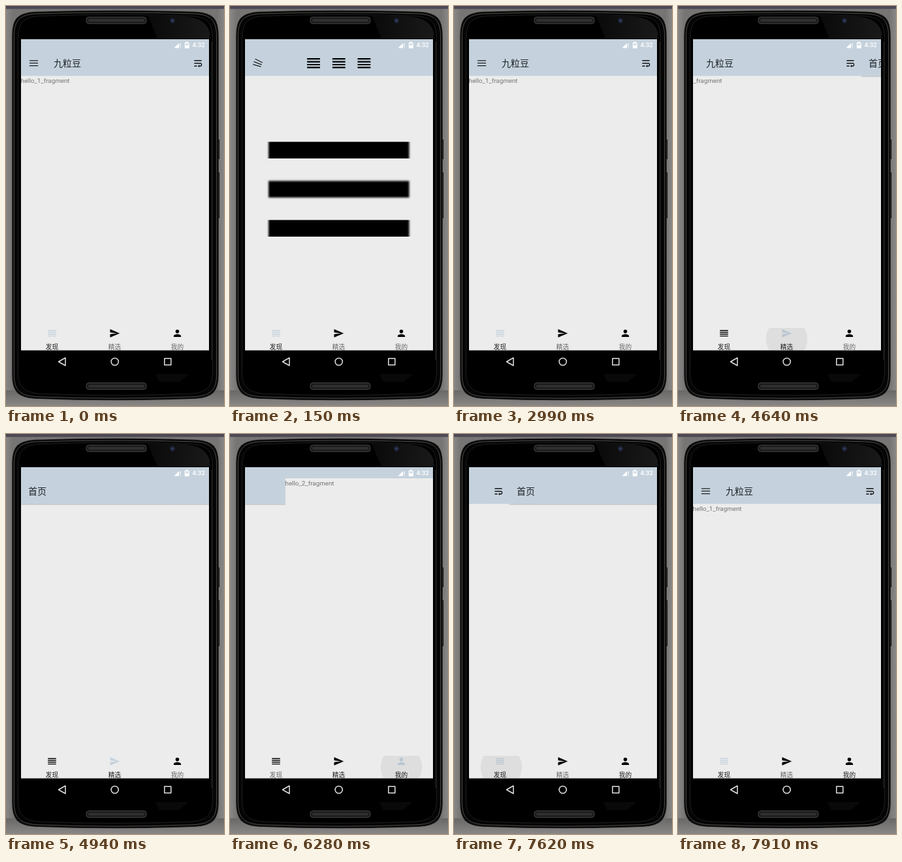
These frames come from a looping animation (334 by 614 pixels, 8 s). An HTML page:

```html
<!DOCTYPE html>
<html lang="zh-CN">
<head>
<meta charset="utf-8">
<style>
  html, body { margin: 0; height: 100%; overflow: hidden; background: #82807f; }
  svg { display: block; width: 100vw; height: 100vh; }
  text { font-family: Roboto, "Noto Sans CJK SC", "Noto Sans CJK", sans-serif; }
  .title { font-size: 14px; fill: #1c2125; }
  .note { font-size: 9.8px; fill: #747474; }
  .label { font-size: 9.7px; text-anchor: middle; }
</style>
</head>
<body>
<svg viewBox="0 0 334 614">
  <defs>
    <linearGradient id="side">
      <stop offset="0" stop-color="#8a8887"/><stop offset=".03" stop-color="#777574"/>
      <stop offset=".97" stop-color="#777574"/><stop offset="1" stop-color="#8a8887"/>
    </linearGradient>
    <linearGradient id="floor" x2="0" y2="1">
      <stop offset="0" stop-color="#6a6867"/><stop offset="1" stop-color="#8a8887"/>
    </linearGradient>
    <linearGradient id="gloss">
      <stop offset="0" stop-color="#0a0a0a"/><stop offset="1" stop-color="#191919"/>
    </linearGradient>
    <linearGradient id="shade" x2="0" y2="1">
      <stop offset="0" stop-color="#b3bac0"/><stop offset="1" stop-color="#dedfe0"/>
    </linearGradient>
    <filter id="soft" x="-5%" y="-30%" width="110%" height="160%"><feGaussianBlur stdDeviation="1.7 .6"/></filter>
    <filter id="softer" x="-5%" y="-30%" width="110%" height="160%"><feGaussianBlur stdDeviation="1.7 1.5"/></filter>
    <clipPath id="view"><rect x="23" y="51" width="288" height="478"/></clipPath>
    <clipPath id="tabs"><rect x="23" y="494" width="288" height="34"/></clipPath>

    <path id="reorder" d="M3 15h18v-2H3zm0 4h18v-2H3zm0-8h18V9H3zm0-6v2h18V5z"/>
    <path id="send" d="M2 21 23 12 2 3v7l15 2-15 2z"/>
    <path id="person" d="M12 12a4 4 0 1 0 0-8 4 4 0 0 0 0 8zm0 2c-2.7 0-8 1.3-8 4v2h16v-2c0-2.7-5.3-4-8-4z"/>
    <path id="wrap" d="M4 19h6v-2H4zM20 5H4v2h16zm-3 6H4v2h13.3a2 2 0 0 1 0 4H15v-2l-3 3 3 3v-2h2a4 4 0 0 0 0-8z"/>
    <path id="case" d="M10 46C10 20 18 11 44 9.500Q167 5.500 291 9.500C317 11 325 20 325 46V566C325 591 317 600 291 602Q167 607 44 602C18 600 10 591 10 566Z"/>
    <g id="slot">
      <rect x="123" width="92" height="10" rx="4" fill="#1b1b1b" stroke="#484848"/>
      <rect x="126" y="3" width="86" height="4" rx="2" fill="#303030"/>
    </g>
  </defs>

  <!-- phone -->
  <rect width="334" height="614" fill="url(#side)"/>
  <rect y="590" width="334" height="24" fill="url(#floor)"/>
  <rect width="334" height="4.5" fill="#4d4856"/>
  <g fill="#2a2a2a" stroke="#a5a4a3" stroke-width=".8">
    <rect x="323" y="204" width="5" height="32" rx="1"/>
    <rect x="323" y="254.500" width="5" height="72" rx="1"/>
  </g>
  <use href="#case" fill="#050505" stroke="#141414" stroke-width="1.600"/>
  <use href="#case" fill="none" stroke="#5a5a5a" stroke-width=".9" transform="translate(2.500 2.500) scale(.985 .992)"/>
  <path d="M18.500 52C18.500 26 26 17 52 15.500Q167 11 283 15.500C309 17 316.500 26 316.500 52V560C316.500 584 309 593 283 595Q167 600 52 595C26 593 18.500 584 18.500 560Z" fill="#000" stroke="#262626" stroke-width=".8"/>
  <path d="M217 14Q270 14 287 18Q306 22 312 40V50H232Z" fill="url(#gloss)"/>
  <path d="M315 55V543" stroke="#171717" stroke-width="2"/>
  <path d="M229 565H280L266 577H235Z" fill="#090909"/>
  <use href="#slot" y="17"/>
  <use href="#slot" y="578.500"/>
  <circle cx="255" cy="22.500" r="4.200" fill="#1b1f2a"/>
  <circle cx="255" cy="22.500" r="2.200" fill="#2c3760"/>

  <!-- screen -->
  <rect x="23" y="51" width="288" height="478" fill="#ececec"/>
  <g clip-path="url(#view)">
    <g id="pages">
      <rect x="23" y="67" width="288" height="40.300" fill="#c5d2dd"/>
      <path id="menu" fill="none" stroke="#1c1f21" stroke-width="1.3"/>
      <g id="home">
        <text class="title" x="73" y="93">九粒豆</text>
        <use href="#wrap" transform="translate(285.600 79.600) scale(.7)" fill="#111"/>
        <text class="note" x="22.500" y="117.500">hello_1_fragment</text>
      </g>
      <g id="detail">
        <use href="#reorder" transform="translate(114.800 74.600) scale(1.1)"/>
        <use href="#reorder" transform="translate(153.600 74.600) scale(1.1)"/>
        <use href="#reorder" transform="translate(192.200 74.600) scale(1.1)"/>
        <rect x="59" y="208.500" width="215.500" height="25.500" filter="url(#soft)"/>
        <rect x="59" y="268.500" width="215.500" height="25.500" filter="url(#softer)"/>
        <rect x="59" y="328.500" width="215.500" height="25.500" filter="url(#soft)"/>
      </g>
      <g transform="translate(288)">
        <rect x="23" y="67" width="288" height="40.300" fill="#c5d2dd"/>
        <rect x="23" y="107.300" width="288" height="2" fill="url(#shade)"/>
        <text class="title" x="34" y="93">首页</text>
      </g>
      <text class="note" x="598.500" y="78.500">hello_2_fragment</text>
    </g>
    <rect x="23" y="51" width="288" height="17" fill="#c5d2dd"/>
  </g>

  <!-- status bar -->
  <g fill="#fff">
    <path d="M257.500 64.500 265 57v7.500z"/>
    <path d="M266.300 57.500h1.300v4.500h-1.300zm0 5.500h1.300v1.500h-1.300z" opacity=".8"/>
    <path d="M275.500 55h3.500v1.200h1.800v8.800h-7v-8.800h1.700z"/>
    <path d="M275 57.200h4.600v3.300H275z" fill="#c5d2dd" opacity=".7"/>
    <text x="285.500" y="63.300" font-size="9.900" font-weight="500">4:32</text>
  </g>

  <g id="nav"></g>
  <circle id="ripple" cy="511" r="31.700" fill-opacity=".06" clip-path="url(#tabs)"/>
  <path d="M23 528.500H311" stroke="#8c8f8c"/>

  <!-- system keys -->
  <g fill="none" stroke="#e2e2e2" stroke-width="1.500" stroke-linejoin="round">
    <path d="M80.500 546 91 540v12z"/>
    <circle cx="166.700" cy="546" r="5.600"/>
    <rect x="242.800" y="541" width="10" height="10"/>
  </g>
</svg>

<script>
const $ = id => document.getElementById(id);
const LOOP = 8000;

const tabs = [['reorder', '发现', 70.5], ['send', '精选', 166.5], ['person', '我的', 262.5]];
$('nav').innerHTML = tabs.map(([icon, label, x]) =>
  `<use href="#${icon}" transform="translate(${x - 8.4} 494) scale(.7)"/>
   <text class="label" x="${x}" y="526.500">${label}</text>`).join('');
const icons = [...$('nav').querySelectorAll('use')];
const labels = [...$('nav').querySelectorAll('text')];

// start ms, scroll px, arrow progress, tab, dark labels, ripple x
const steps = [
  [0, 0, 0, 0, [0]],
  [150, 0, .12, 0, [0]],
  [300, 0, .45, 0, [0]],
  [450, 0, .85, 0, [0]],
  [600, 0, 1, 0, [0]],
  [2990, 0, 0, 0, [0]],
  [4640, 30, 0, 1, [0, 1], 166.5],
  [4790, 287, 0, 1, [0, 1]],
  [4940, 288, 0, 1, [0, 1]],
  [6280, 514, 0, 2, [1, 2], 262.5],
  [6420, 576, 0, 2, [1, 2]],
  [7620, 226, 0, 0, [0, 2], 72.5],
  [7770, 2, 0, 0, [0, 2]],
  [7910, 0, 0, 0, [0, 2]],
];

// Three bars that fold into a back arrow while turning half a circle.
function drawMenu(p) {
  const mix = (a, b) => a + (b - a) * p;
  const angle = mix(0, Math.PI / 4), size = mix(13.2, 8.4);
  const dx = size * Math.cos(angle), dy = size * Math.sin(angle);
  const left = -mix(13.2, 12) / 2, gap = mix(3.9, -.5);
  $('menu').setAttribute('d', `M${left + p * .5} 0H${-left}
    M${left} ${gap}l${dx} ${dy}M${left} ${-gap}l${dx} ${-dy}`);
  $('menu').setAttribute('transform', `translate(42.500 87.700) rotate(${mix(-180, 0)})`);
}

function draw(now) {
  const t = now % LOOP;
  const [, scroll, arrow, tab, dark, ripple] = steps.findLast(s => s[0] <= t);
  $('pages').setAttribute('transform', `translate(${-scroll})`);
  $('home').style.display = arrow ? 'none' : '';
  $('detail').style.display = arrow ? '' : 'none';
  drawMenu(arrow);
  icons.forEach((icon, i) => icon.setAttribute('fill', i === tab ? '#c5d2dd' : '#000'));
  labels.forEach((label, i) => label.setAttribute('fill', dark.includes(i) ? '#1c1c1c' : '#686868'));
  $('ripple').style.display = ripple ? '' : 'none';
  $('ripple').setAttribute('cx', ripple || 0);
}

const start = performance.now();
(function tick() {
  draw(performance.now() - start);
  requestAnimationFrame(tick);
})();
</script>
</body>
</html>
```
